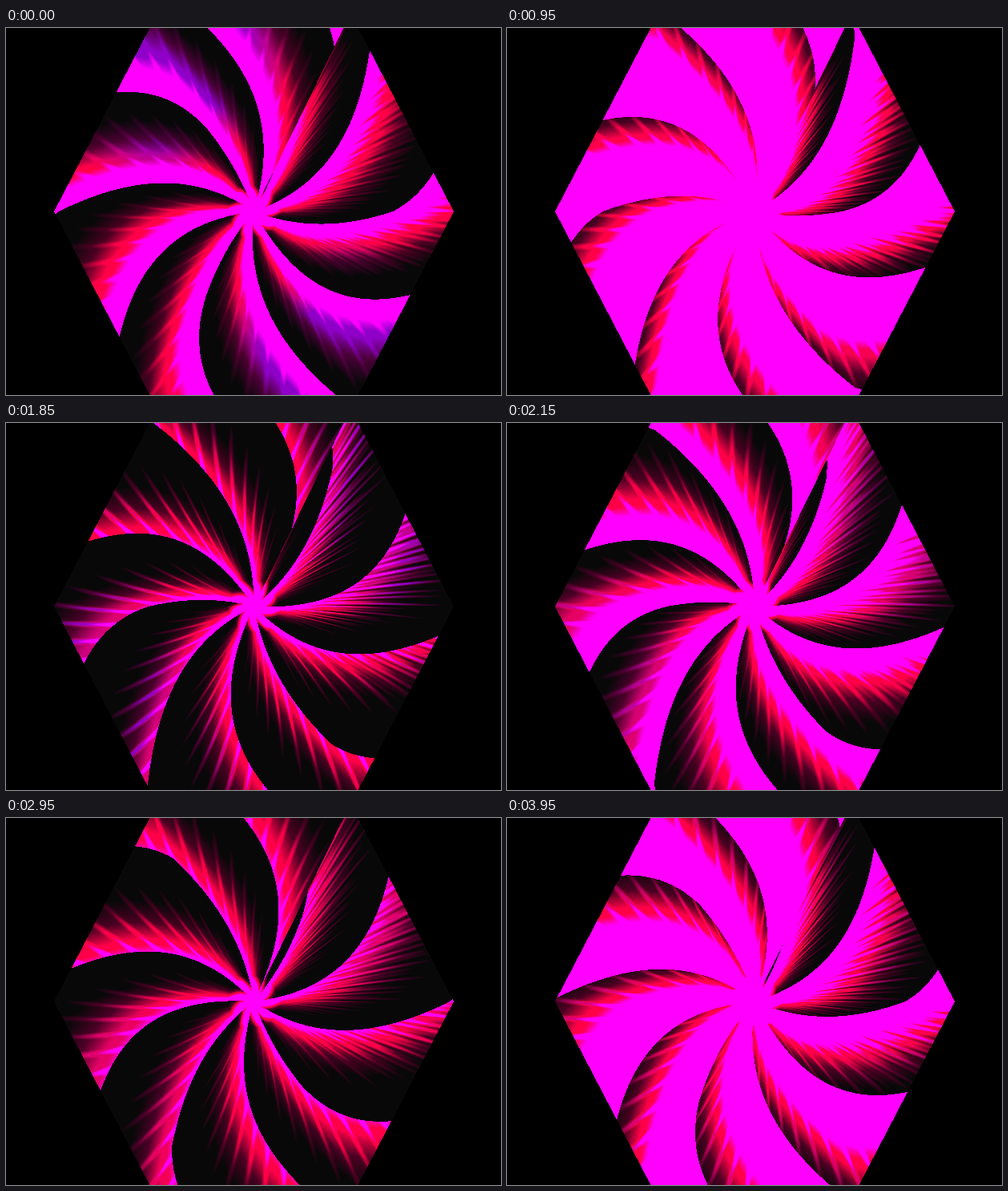
These frames come from a looping animation (618x458 px, 4000 ms). An HTML page with a canvas:

```html
<!DOCTYPE html>
<html lang="en">
<head>
<meta charset="utf-8">
<title>Spinning hexagon fan</title>
<style>
  html, body { margin: 0; width: 100%; height: 100%; overflow: hidden; background: #000; }
  canvas { display: block; }
</style>
</head>
<body>
<canvas id="stage" width="618" height="458"></canvas>
<script>
const W = 618, H = 458, CX = 309.5, CY = 229;
const HALF_W = 249.5, HALF_H = 229, HALF_TOP = 130;
const SLOPE = (HALF_W - HALF_TOP) / HALF_H;
const PITCH = 152.5;          // distance between blade tips along the rim
const SEAM_X = 112;           // where the first blade starts on the top side
const LOOP = 4000, STEP = 50;

const ctx = document.getElementById('stage').getContext('2d');
const image = ctx.createImageData(W, H);
const out = image.data;

const clamp = (v, lo = 0, hi = 1) => Math.min(hi, Math.max(lo, v));
const smooth = (a, b, v) => { const t = clamp((v - a) / (b - a)); return t * t * (3 - 2 * t); };
const mix = (a, b, t) => a + (b - a) * t;

// Clockwise rim position, in blade pitches from the seam.
const CORNER = (HALF_TOP - SEAM_X) / PITCH;
const SIDE = 2 * HALF_H / PITCH, FLAT = 2 * HALF_TOP / PITCH;
const TOTAL = 2 * SIDE + 2 * FLAT;
function rimPosition(x, y, flat) {
  if (flat && y < 0) {
    const u = (x - SEAM_X) / PITCH;
    return u < 0 ? u + TOTAL : u;
  }
  if (flat) return CORNER + SIDE + (HALF_TOP - x) / PITCH;
  if (x > 0) return CORNER + (y + HALF_H) / PITCH;
  return CORNER + SIDE + FLAT + (HALF_H - y) / PITCH;
}

function barbs(u, rho) {
  const lean = 1.6 * (1 - rho);
  const wave = f => Math.sin(2 * Math.PI * (f * u + lean));
  const broad = Math.max(0, wave(6.5)) ** 2 - 0.3;
  const fine = 0.55 * wave(15) + 0.45 * wave(23.7) + 0.3 * wave(9.3);
  return mix(fine, broad, smooth(1.8, 2.8, u)) * smooth(0.08, 0.5, rho);
}

const N = W * H;
const field = () => new Float32Array(N);
const phase = field(), radius = field(), near = field(), barb = field(), tint = field();
const inside = [];

for (let y = 0, i = 0; y < H; y++) {
  for (let x = 0; x < W; x++, i++) {
    out[i * 4 + 3] = 255;
    const dx = x + 0.5 - CX, dy = y + 0.5 - CY;
    const vertical = Math.abs(dy) / HALF_H;
    const slanted = (Math.abs(dx) + SLOPE * Math.abs(dy)) / HALF_W;
    const rho = Math.max(vertical, slanted, 0.001);
    if (rho > 1) continue;
    const u = rimPosition(dx / rho, dy / rho, vertical > slanted);
    const depth = 1 - rho;
    inside.push(i);
    radius[i] = rho;
    phase[i] = u - 1.13 * depth + 0.3 * depth * depth + 10;
    near[i] = Math.max(0, 1 - u / 3.6);
    barb[i] = barbs(u, rho);
    tint[i] = Math.cos(2 * (Math.atan2(dy, dx) - Math.PI / 3)) * smooth(0.3, 0.75, rho);
  }
}

// step, reach, softness, dimming near the seam, core glow, barbs, violet balance, violet on barbs
const looks = [
  [0, 0.76, 0.58, -0.05, 0.22, 0.07, 1.6, 0],
  [10, 1.17, 0.42, -0.22, 0.5, 0.13, 1.5, 0],
  [27, 1.1, 0.5, -0.45, 0.32, 0.06, -1.2, 0],
  [37, 0.5, 0.6, 0, 0.35, 0.2, -0.5, 0.9],
  [49, 1.14, 0.58, -0.12, 0.35, 0.05, -0.25, 0],
  [59, 0.58, 0.64, 0, 0.25, 0.14, -0.25, 0.1],
  [79, 1.1, 0.55, -0.48, 0.35, 0.13, 0, 0.5],
  [80, 0.76, 0.58, -0.05, 0.22, 0.07, 1.6, 0]
];

function lookAt(step) {
  const k = looks.findIndex(l => l[0] > step);
  const a = looks[k - 1], b = looks[k];
  const t = (step - a[0]) / (b[0] - a[0]);
  return a.map((v, j) => mix(v, b[j], t));
}

function paint(i, e, violet) {
  let r, g = 0, b;
  const midR = 255 - 112 * violet, midB = 72 + 128 * violet;
  if (e < 0.35) {
    const t = e / 0.35;
    r = mix(8, 76, t); g = mix(8, 0, t); b = mix(8, 34 + 24 * violet, t);
  } else if (e < 0.65) {
    const t = (e - 0.35) / 0.3;
    r = mix(76, midR, t); b = mix(34 + 24 * violet, midB, t);
  } else {
    const t = clamp((e - 0.76) / 0.16);
    r = mix(midR, 255, t); b = mix(midB, 255, t);
  }
  out[i * 4] = r; out[i * 4 + 1] = g; out[i * 4 + 2] = b;
}

function draw(step) {
  const [, reach, soft, dim, core, rough, balance, barbViolet] = lookAt(step);
  const tip = 0.302 - 1.82 * step / PITCH;
  for (const i of inside) {
    const q = phase[i] - tip, p = q - Math.floor(q);
    const rho = radius[i], depth = 1 - rho;
    const glow = core * depth * depth + Math.max(0, 0.14 - rho) * 8;
    const e = (reach + dim * near[i] + glow + rough * barb[i] - p) / soft;
    const violet = clamp(balance * tint[i] + barbViolet * Math.max(0, barb[i]) * smooth(0.4, 0.8, rho));
    paint(i, clamp(e), violet);
  }
  ctx.putImageData(image, 0, 0);
}

const start = performance.now();
let shown = -1;
function tick() {
  const step = Math.floor(((performance.now() - start) % LOOP) / STEP);
  if (step !== shown) draw(shown = step);
  requestAnimationFrame(tick);
}
tick();
</script>
</body>
</html>
```
